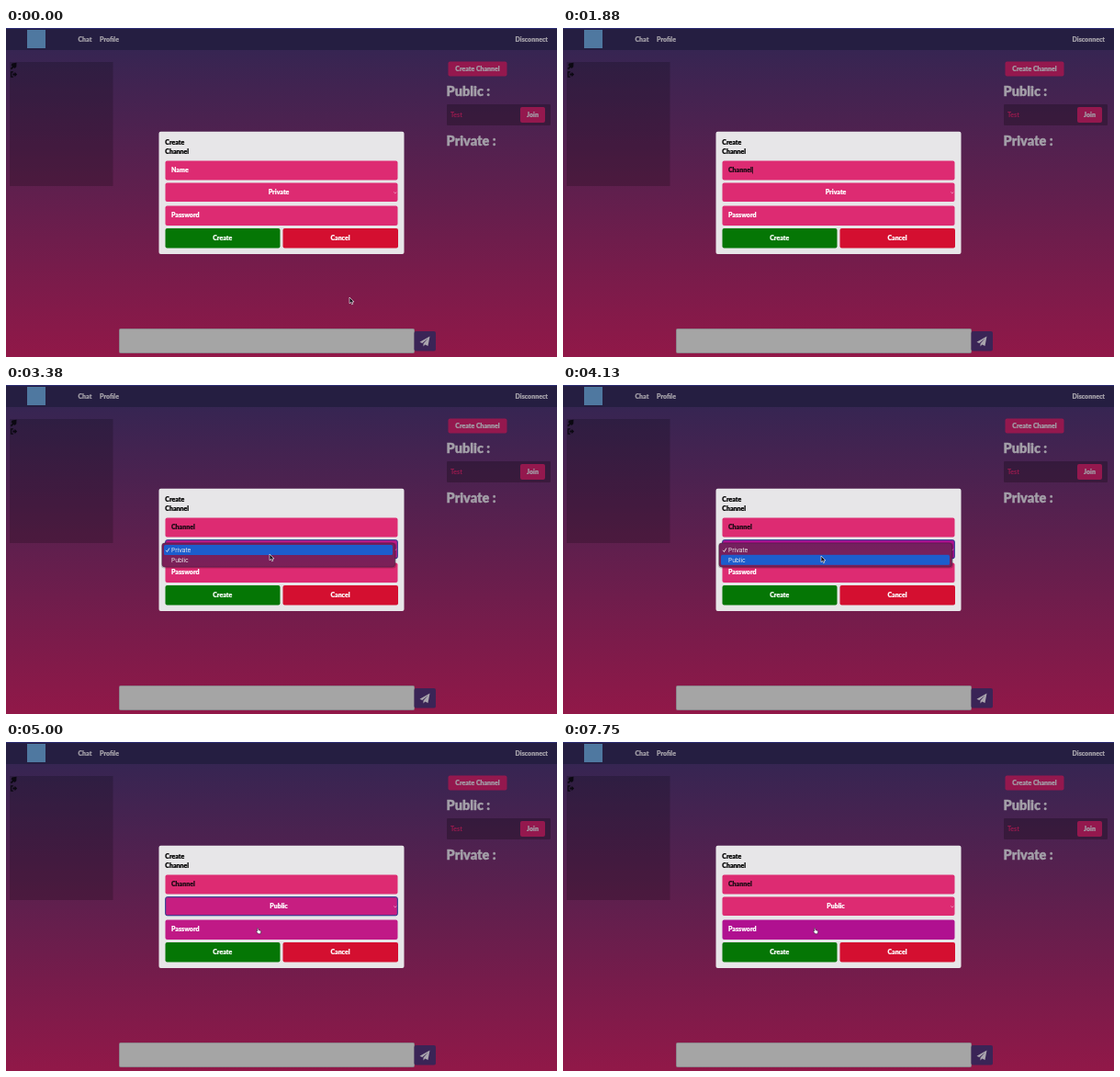
An HTML page that plays this animation: 600 px wide and 358 px high, repeating every 8000 ms.

```html
<!DOCTYPE html>
<html lang="en">
<head>
<meta charset="utf-8">
<title>Create channel</title>
<style>
html, body { margin: 0; width: 100%; height: 100%; overflow: hidden; background: #5d1f50; }
svg { display: block; width: 100%; height: 100%; }
text { font: 900 7px Lato, sans-serif; fill: currentColor; stroke: currentColor; stroke-width: .2; }
.h { font-size: 14.5px; stroke-width: .35; }
.menu text { font: 400 6.5px Inter, sans-serif; color: #eee; stroke: none; }
.dim { color: #a39fa8; }
.white { color: #fff; }
.test { color: #9b1a4f; font-weight: 700; stroke: none; }
.mid { text-anchor: middle; }
.field { fill: #dd2b72; }

.anim { animation: 8s linear infinite; }
.hard { animation-timing-function: step-end; }
.pointer { animation-name: move; animation-timing-function: ease-in-out; }
.shown { animation-name: shown; }
.arrow { animation-name: arrow; }
.hand { animation-name: hand; }
.select { animation-name: select; }
.password { animation-name: password; }
.ring { animation-name: ring; }
.menu { animation-name: menu; }
.pick { animation-name: pick; }
.private { animation-name: private; }
.public { animation-name: public; }

@keyframes move {
  0%, 29.75% { transform: translate(374px, 293px); }
  38.1%, 40.6% { transform: translate(290px, 181px); }
  42.25% { transform: translate(287px, 184px); }
  45% { transform: translate(284px, 186px); }
  51.6%, 54.75% { transform: translate(281px, 186px); }
  59.4%, 100% { transform: translate(273px, 202px); }
}
@keyframes shown { 0% { opacity: 1; } 9.375% { opacity: 0; } 29.75%, 100% { opacity: 1; } }
@keyframes arrow { 0% { opacity: 1; } 37.5% { opacity: 0; } 40.6% { opacity: 1; } 54.75%, 100% { opacity: 0; } }
@keyframes hand { 0% { opacity: 0; } 37.5% { opacity: 1; } 40.6% { opacity: 0; } 54.75%, 100% { opacity: 1; } }
@keyframes select { 0%, 38.5% { fill: #dd2b72; } 44%, 59.4% { fill: #b01090; } 65.6%, 100% { fill: #dd2b72; } }
@keyframes password { 0%, 58.8% { fill: #dd2b72; } 64.5%, 100% { fill: #b01090; } }
@keyframes ring { 0% { opacity: 0; } 40.6% { opacity: 1; } 67.5%, 100% { opacity: 0; } }
@keyframes menu { 0% { opacity: 0; } 40.6% { opacity: 1; } 54.75%, 100% { opacity: 0; } }
@keyframes pick { 0% { transform: none; } 45%, 100% { transform: translateY(10.8px); } }
@keyframes private { 0% { opacity: 1; } 54.75%, 100% { opacity: 0; } }
@keyframes public { 0% { opacity: 0; } 54.75%, 100% { opacity: 1; } }
</style>
</head>
<body>
<svg viewBox="0 0 600 358" preserveAspectRatio="none">
  <defs>
    <linearGradient id="bg" x1="0" y1="0" x2="0" y2="1">
      <stop offset="0" stop-color="#302653"/>
      <stop offset="1" stop-color="#911848"/>
    </linearGradient>
    <linearGradient id="glass" x1="0" y1="0" x2="0" y2="1">
      <stop offset="0" stop-color="#73205f"/>
      <stop offset="1" stop-color="#7c2057"/>
    </linearGradient>
  </defs>
  <rect width="600" height="358" fill="url(#bg)"/>

  <!-- navigation -->
  <rect width="600" height="24" fill="#251e41"/>
  <rect width="600" height="1" fill="#2b2c72"/>
  <rect x="23" y="2" width="20" height="20" fill="#4f78a0"/>
  <g class="dim">
    <text x="78.5" y="14.5">Chat</text>
    <text x="102" y="14.5">Profile</text>
    <text x="554.5" y="14.5">Disconnect</text>
  </g>

  <!-- member panel -->
  <rect x="4" y="37" width="112.5" height="135" fill="#000" fill-opacity=".2"/>
  <g fill="#0b0811">
    <path d="M6.5 38.5l5-.8-.2 4.6-2 1.6-1-1-2.3 2.3-1.2-1.2 2.2-2.2-1.3-1z"/>
    <path d="M8 47.2H5v6.6h3v-1.2H6.2v-4.2H8zM7.3 49.6h2.2v-1.8l2.6 2.7-2.6 2.7v-1.8H7.3z"/>
  </g>

  <!-- channel list -->
  <rect x="481.5" y="36.5" width="64" height="16" rx="2" fill="#94184e"/>
  <rect x="480" y="83" width="113" height="23" rx="1" fill="#000" fill-opacity=".25"/>
  <rect x="560" y="86" width="27" height="17" rx="2" fill="#94184e"/>
  <g class="dim">
    <text x="513.5" y="47.2" class="mid">Create Channel</text>
    <text x="479.5" y="74.4" class="h">Public :</text>
    <text x="479.5" y="127.7" class="h">Private :</text>
    <text x="573.5" y="97.2" class="mid">Join</text>
  </g>
  <text x="484" y="97.2" class="test">Test</text>

  <!-- message bar -->
  <rect x="123.5" y="327.5" width="321" height="26" rx="1" fill="#a5a5a5" stroke="#8d858c"/>
  <rect x="444.5" y="330" width="23.5" height="21.5" rx="2" fill="#3a2456"/>
  <path d="M461.5 335.5l-11 6.2 2.8 1.2 6.2-5.2-5 5.9v3l1.8-2.1 3.2 1.4z" fill="#aaa5ae"/>

  <!-- dialog -->
  <rect x="166.5" y="112.8" width="267" height="133.2" rx="2" fill="#e7e6e8"/>
  <text x="173.3" y="127">Create</text>
  <text x="173.3" y="136.8">Channel</text>
  <rect class="field" x="173.5" y="144.5" width="253" height="21" rx="2"/>
  <rect class="field anim select" x="173.5" y="168.5" width="253" height="20.5" rx="2"/>
  <rect class="anim hard ring" x="173.7" y="168.7" width="252.6" height="20.1" rx="2" fill="none" stroke="#1c3f93"/>
  <rect class="field anim password" x="173.5" y="193.5" width="253" height="21.5" rx="2"/>
  <rect x="173.5" y="218" width="125" height="21.5" rx="2" fill="#057605"/>
  <rect x="301.5" y="218" width="125.5" height="21.5" rx="2" fill="#d40f30"/>
  <path d="M422.3 178.5l1.5 1.4 1.5-1.4" fill="none" stroke="#f3c6da" stroke-width=".7"/>
  <text id="name" x="180" y="157.3"></text>
  <rect id="caret" y="151" width=".8" height="7.5" fill="#1a0a14"/>
  <g class="white">
    <text x="297" y="181.2" class="mid anim hard private">Private</text>
    <text x="297" y="181.2" class="mid anim hard public">Public</text>
    <text x="180" y="206.3">Password</text>
    <text x="235.7" y="231.2" class="mid">Create</text>
    <text x="364" y="231.2" class="mid">Cancel</text>
  </g>

  <!-- options -->
  <g class="menu anim hard">
    <rect x="169" y="171.5" width="256" height="28" rx="3.5" fill="#000" fill-opacity=".2"/>
    <rect x="170" y="172" width="253.5" height="26" rx="3" fill="url(#glass)" stroke="#4f1c46" stroke-width=".6"/>
    <rect class="anim hard pick" x="172" y="174" width="249" height="11" rx="1.5" fill="#1c5dcd"/>
    <path d="M174.2 179.8l1.3 1.7 2.4-4" fill="none" stroke="#eee" stroke-width=".9"/>
    <text x="180" y="181.8">Private</text>
    <text x="180" y="192.7">Public</text>
  </g>

  <!-- pointer -->
  <g class="anim pointer">
    <g class="anim hard shown" stroke="#fff" stroke-width=".6" stroke-linejoin="round">
      <path class="anim hard arrow" d="M0 0v6.8l1.6-1.4 1 2.4 1.2-.5-1-2.3h2.2z" fill="#17101c"/>
      <path class="anim hard hand" d="M.4.6q.7-.8 1.2.1l.4 2 2 .5q.9.3.7 1.3l-.5 2.3H1.7L-.5 4.3q0-1 1.2-.3z" fill="#fff" stroke="#3a1a3a"/>
    </g>
  </g>
</svg>
<script>
const LOOP = 8000, WORD = 'Channel', START = 750, KEY = 125, CLICK = 3250;
const field = document.getElementById('name');
const caret = document.getElementById('caret');

function draw(now) {
  const t = now % LOOP;
  const typed = t < START ? 0 : Math.min(WORD.length, Math.floor((t - START) / KEY) + 1);
  const value = typed ? WORD.slice(0, typed) : 'Name';
  if (field.textContent !== value) {
    field.textContent = value;
    field.style.color = typed ? '#1a0a14' : '#fff';
    caret.setAttribute('x', 180.3 + field.getComputedTextLength());
  }
  const end = START + KEY * WORD.length;
  const blink = t < end || (t - end) % 1000 < 500;
  caret.style.opacity = typed && t < CLICK && blink ? 1 : 0;
  requestAnimationFrame(() => draw(performance.now()));
}
draw(performance.now());
</script>
</body>
</html>
```
